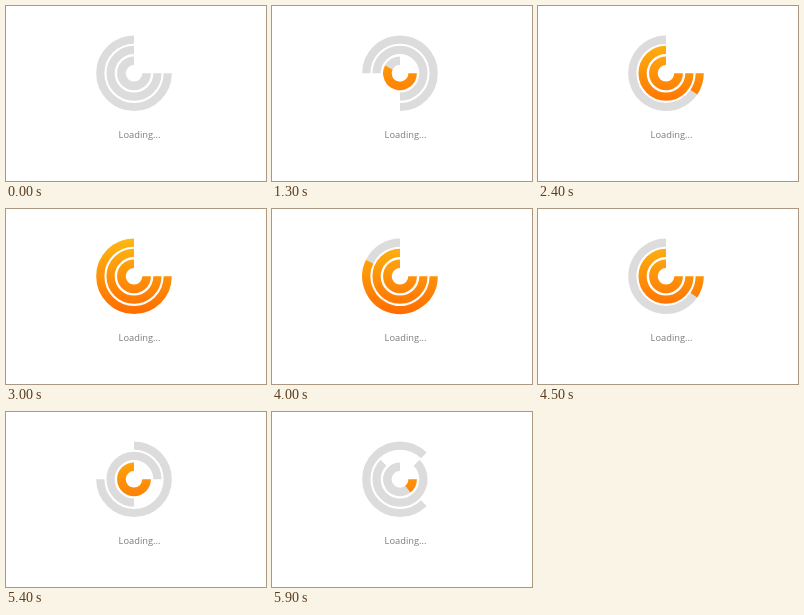
Recreate the animation shown at these times as an HTML page. Size 260 px wide and 175 px high, loop 6 s.

```html
<!DOCTYPE html>
<html lang="en">
<head>
<meta charset="utf-8">
<title>Loading</title>
<style>
  html, body { margin: 0; width: 100%; height: 100%; overflow: hidden; background: #fff; }
  svg { display: block; width: 100%; height: 100%; }
  path { fill: none; }
  text { font: 9.3px "Open Sans", "Noto Sans", sans-serif; fill: #7c7c7c; }
</style>
</head>
<body>
<svg viewBox="0 0 260 175">
  <defs>
    <linearGradient id="glow" gradientUnits="userSpaceOnUse" x1="0" y1="29" x2="0" y2="105">
      <stop offset="0" stop-color="#fdb913"/>
      <stop offset="1" stop-color="#ff6c00"/>
    </linearGradient>
  </defs>
  <g id="rings"></g>
  <text x="112.6" y="132">Loading...</text>
</svg>
<script>
  const CX = 128, CY = 67.3;
  const STAGE = 7, STEPS = 3 * STAGE, STEP_MS = 100, HOLD_MS = 1000, LOOP_MS = 6000;
  const SWEEP = 270;

  // Inner to outer; speed is the fill in degrees per step.
  const rings = [
    { radius: 12.6, width: 8.6, speed: 52 },
    { radius: 23.4, width: 8.2, speed: 47.7 },
    { radius: 33.7, width: 8.2, speed: 34.3 }
  ];

  function addPath(ring, stroke) {
    const path = document.createElementNS("http://www.w3.org/2000/svg", "path");
    path.setAttribute("stroke", stroke);
    path.setAttribute("stroke-width", ring.width);
    document.getElementById("rings").append(path);
    return path;
  }

  for (const ring of rings) {
    ring.base = addPath(ring, "#dcdcdc");
    ring.fill = addPath(ring, "url(#glow)");
  }

  function arc(radius, from, to) {
    if (to <= from) return "";
    const point = deg => {
      const a = deg * Math.PI / 180;
      return `${(CX + radius * Math.cos(a)).toFixed(3)} ${(CY + radius * Math.sin(a)).toFixed(3)}`;
    };
    return `M${point(from)}A${radius} ${radius} 0 ${to - from > 180 ? 1 : 0} 1 ${point(to)}`;
  }

  // Steps up to the full state, a pause, then the same steps back.
  function stepAt(ms) {
    const riseEnd = HOLD_MS + (STEPS - 1) * STEP_MS;
    if (ms < HOLD_MS) return 0;
    if (ms < riseEnd) return Math.floor((ms - HOLD_MS) / STEP_MS) + 1;
    if (ms < riseEnd + HOLD_MS) return STEPS;
    return STEPS - 1 - Math.floor((ms - riseEnd - HOLD_MS) / STEP_MS);
  }

  function draw(step) {
    const stage = Math.floor(step / STAGE);
    const turn = step % STAGE * 45;
    rings.forEach((ring, i) => {
      const local = step - i * STAGE;
      const filled = local >= STAGE ? SWEEP : Math.max(0, Math.min(SWEEP, local * ring.speed));
      const spin = i > stage ? (i === 1 ? -turn : turn) : 0;
      ring.base.setAttribute("d", arc(ring.radius, spin + filled, spin + SWEEP));
      ring.fill.setAttribute("d", arc(ring.radius, 0, filled));
    });
  }

  const start = performance.now();
  function tick() {
    draw(stepAt((performance.now() - start) % LOOP_MS));
    requestAnimationFrame(tick);
  }
  tick();
</script>
</body>
</html>
```
